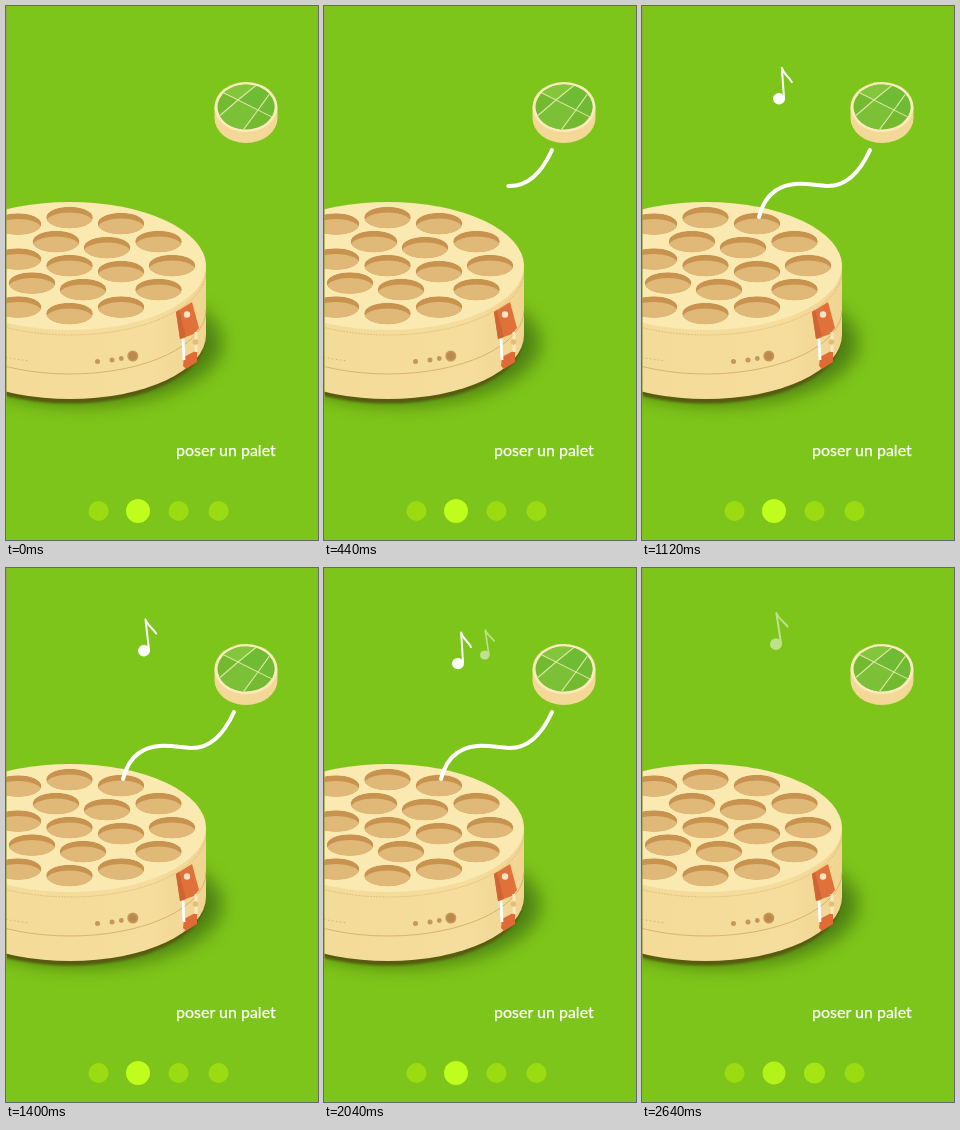
Recreate the animation shown at these times as an HTML page. Size 312 px wide and 534 px high, loop 2680 ms.

```html
<!DOCTYPE html>
<html lang="fr">
<head>
<meta charset="utf-8">
<title>poser un palet</title>
<style>
  html, body { margin: 0; width: 100%; height: 100%; overflow: hidden; background: #7ec51b; }
  svg { display: block; width: 312px; height: 534px; }
  text { font: 400 16px Lato, sans-serif; fill: #fff; stroke: #fff; stroke-width: .25px; }
  .dot { fill: #9bdb12; }
</style>
</head>
<body>
<svg viewBox="0 0 312 534">
  <defs>
    <filter id="glow" x="-20%" y="-40%" width="140%" height="180%"><feGaussianBlur stdDeviation="9"/></filter>
    <filter id="soft" x="-5%" y="-5%" width="110%" height="110%"><feGaussianBlur stdDeviation="1"/></filter>
    <linearGradient id="side">
      <stop offset="0" stop-color="#f3da98"/>
      <stop offset=".8" stop-color="#f5dd9d"/>
      <stop offset="1" stop-color="#f1d491"/>
    </linearGradient>
    <clipPath id="face"><ellipse cx="240" cy="101" rx="28.5" ry="22.5"/></clipPath>
    <clipPath id="pit"><ellipse rx="23.3" ry="10.8"/></clipPath>
    <g id="hole" clip-path="url(#pit)">
      <ellipse rx="23.3" ry="10.8" fill="#c8924f"/>
      <ellipse cy="5.5" rx="24" ry="10.5" fill="#e0b877"/>
    </g>
    <g id="note">
      <ellipse rx="6" ry="5.7" fill="#fff"/>
      <path d="M5 -1L3.2 -31C5 -24 10.500 -22 13 -16.500" fill="none" stroke="#fff" stroke-width="2" stroke-linejoin="round" stroke-linecap="round"/>
    </g>
  </defs>

  <rect width="312" height="534" fill="#7ec51b"/>

  <g id="box">
    <ellipse cx="77" cy="337" rx="139" ry="62" fill="#365c08" opacity=".65" filter="url(#glow)"/>
    <ellipse cx="64" cy="333" rx="135" ry="64.500" fill="#575c10" filter="url(#soft)"/>
    <path d="M-72 260V329A136 64 0 0 0 200 329V260Z" fill="url(#side)"/>
    <ellipse cx="64" cy="260" rx="136" ry="64" fill="#fae9b0"/>
    <g fill="none" stroke="#d3a866" stroke-width=".8">
      <path d="M-72 265A136 64 0 0 0 200 265" stroke-dasharray="2 1" opacity=".65"/>
      <path d="M-72 304A136 64 0 0 0 200 304"/>
      <path d="M0 351.5L23 355" stroke-dasharray="1.5 2.5"/>
    </g>
    <g fill="#c69758">
      <circle cx="91.5" cy="355.5" r="2.5"/>
      <circle cx="106" cy="354" r="2.5"/>
      <circle cx="115.3" cy="352.5" r="2.4"/>
      <circle cx="126.8" cy="350" r="5.5"/>
      <circle cx="126.8" cy="350" r="3.8" fill="#b98a4c"/>
    </g>
    <path d="M170 306L186 296L193 322L188 328L174 333Z" fill="#e0713b"/>
    <path d="M170 306L174 333L180 331L173 304Z" fill="#cf6532"/>
    <circle cx="181" cy="308.5" r="3.2" fill="#f9e4c4"/>
    <path d="M178 351L191 344V356L180 363L177 360Z" fill="#df6b36"/>
    <path d="M177 333L178 354" stroke="#fff" stroke-width="2.8"/>
    <path d="M190 326V346" stroke="#fae9bf" stroke-width="3"/>
    <circle cx="189.5" cy="336" r="2.8" fill="#e5bd7b"/>
  </g>

  <g id="palet">
    <path d="M208.5 101V112A31.5 25 0 0 0 271.5 112V101Z" fill="#f3d898"/>
    <ellipse cx="240" cy="101" rx="31.5" ry="25" fill="#faebbb"/>
    <g clip-path="url(#face)">
      <rect x="208" y="76" width="64" height="50" fill="#73ba30"/>
      <path d="M208 76H254L232 94L212 84Z" fill="#83c63c"/>
      <path d="M232 94L252 104L236 126L212 112Z" fill="#7bc036"/>
      <path d="M254 78L272 80V114L252 104L232 94Z" fill="#70bb34"/>
      <path d="M212 84L270 113M211 112L232 94L253 77M235 127L252 104L267 83" fill="none" stroke="#dfe9a6" stroke-width="1.1"/>
    </g>
  </g>

  <path id="trail" d="M228 144C218 166 204 181 184 180C166 178.500 149 174 133 185C125 190.500 120 199 117 211" pathLength="1" fill="none" stroke="#fff" stroke-width="4" stroke-linecap="round"/>
  <g id="notes"></g>

  <text x="170" y="450">poser un palet</text>
  <circle class="dot" cx="92.500" cy="505" r="10"/>
  <circle id="active" cx="132" cy="505" r="12"/>
  <circle id="next" cx="172.500" cy="505" r="10"/>
  <circle class="dot" cx="212.500" cy="505" r="10"/>
  <path d="M.5 0V395" stroke="#9aa548" opacity=".7"/>
</svg>
<script>
const LOOP = 2680;
const $ = id => document.getElementById(id);
const clamp = v => Math.max(0, Math.min(1, v));
const span = (t, a, b) => clamp((t - a) / (b - a));
const mix = (a, b, p) => a + (b - a) * p;
const set = (el, attrs) => { for (const k in attrs) el.setAttribute(k, attrs[k]); };
const color = (a, b, p) => `rgb(${a.map((v, i) => Math.round(mix(v, b[i], p)))})`;

function use(id, parent) {
  const el = document.createElementNS('http://www.w3.org/2000/svg', 'use');
  el.setAttribute('href', '#' + id);
  return parent.appendChild(el);
}

const holes = [
  [12, 218], [63.5, 211.5], [115, 217.5], [50, 235.5], [101, 241.5], [152.5, 235.5],
  [12, 253], [63.5, 259.5], [115, 265.5], [166, 259.5], [26, 277], [77, 283.5],
  [152.5, 283.5], [12, 301], [63.5, 307.5], [115, 301]
];
for (const [x, y] of holes) set(use('hole', $('box')), { transform: `translate(${x} ${y})` });

// Each note drifts up, tilts a little and fades at the end of its life.
const notes = [
  { start: 920, life: 820, x: [136.3, 139.2], y: [100, 70.5], size: 1 },
  { start: 1500, life: 640, x: [163.6, 160.3], y: [120, 81], size: 0.8 },
  { start: 1920, life: 820, x: [134, 134], y: [99.5, 73], size: 1 }
];
for (const n of notes) n.el = use('note', $('notes'));

const DIM = [155, 219, 18], LIT = [190, 253, 28];

function draw(t) {
  const drawn = 1 - (1 - span(t, 187, 1025)) ** 1.5;
  set($('trail'), {
    'stroke-dasharray': `${drawn} 2`,
    opacity: drawn ? 1 - span(t, 2300, 2560) : 0
  });

  for (const n of notes) {
    const age = t - n.start, p = age / n.life;
    const alpha = age < 0 ? 0 : Math.min(clamp(age / 100), clamp((n.life - age) / 200));
    set(n.el, {
      opacity: alpha,
      transform: `translate(${mix(...n.x, p)} ${mix(...n.y, p)}) rotate(${mix(1, -6, p)}) scale(${n.size})`
    });
  }

  const swap = 0.28 * span(t, 2560, 2640);
  set($('active'), { r: mix(12, 10, swap), fill: color(LIT, DIM, swap) });
  set($('next'), { r: mix(10, 12, swap), fill: color(DIM, LIT, swap) });
}

const begin = performance.now();
function tick() {
  draw((performance.now() - begin) % LOOP);
  requestAnimationFrame(tick);
}
tick();
</script>
</body>
</html>
```
